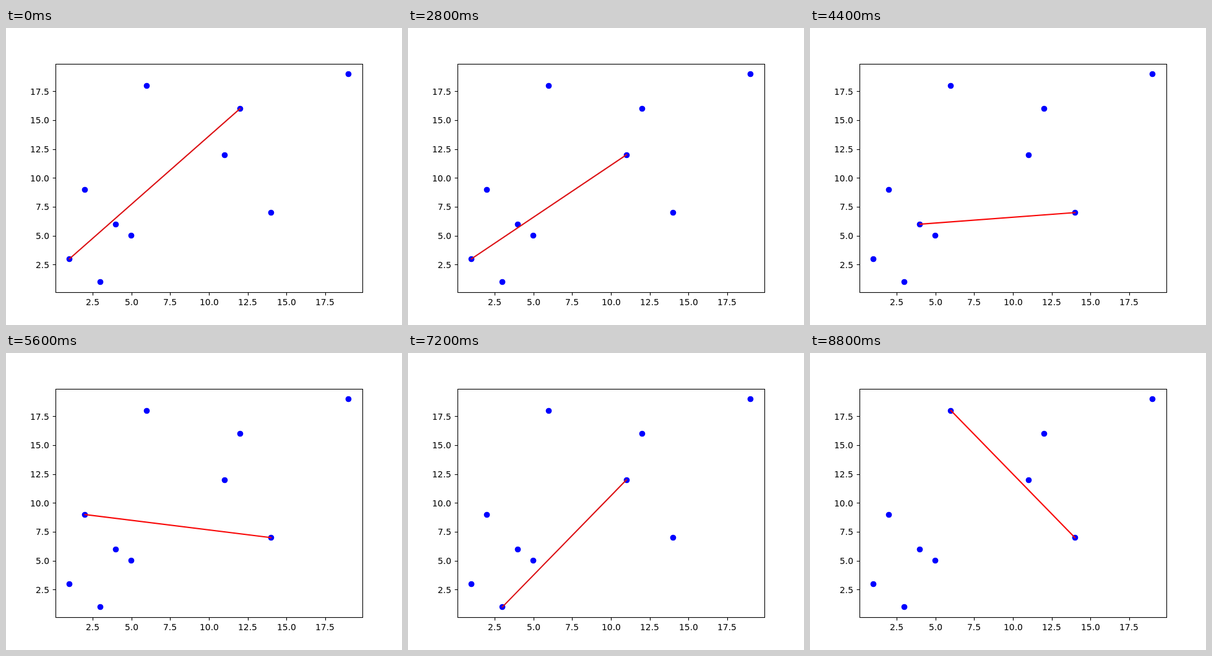
These frames come from a looping animation (640 px wide and 480 px high, 9 s). An HTML page with a canvas:

```html
<!DOCTYPE html>
<html lang="en">
<head>
<meta charset="utf-8">
<title>Point pairs</title>
<style>
  html, body { margin: 0; width: 640px; height: 480px; overflow: hidden; background: #fff; }
  canvas { display: block; }
</style>
</head>
<body>
<canvas id="plot" width="640" height="480"></canvas>
<script>
const ctx = document.getElementById('plot').getContext('2d');

const STEP_MS = 200;
const PT = 100 / 72; // pixels per typographic point
const AXES = { left: 80, top: 57.6, width: 496, height: 369.6 };
const RANGE = { min: 0.1, max: 19.9 };
const TICKS = [2.5, 5, 7.5, 10, 12.5, 15, 17.5];
const POINTS = [
  [12, 16], [1, 3], [4, 6], [2, 9], [19, 19],
  [3, 1], [5, 5], [11, 12], [14, 7], [6, 18]
];

// Every unordered pair, in order of its first point and then its second.
const PAIRS = POINTS.flatMap((a, i) => POINTS.slice(i + 1).map(b => [a, b]));

const span = RANGE.max - RANGE.min;
const toX = v => AXES.left + AXES.width * (v - RANGE.min) / span;
const toY = v => AXES.top + AXES.height * (RANGE.max - v) / span;
const snapLine = v => Math.floor(v + 0.5) + 0.5;
const snapDot = v => Math.floor(v) + 0.5;

function segment(x1, y1, x2, y2) {
  ctx.beginPath();
  ctx.moveTo(x1, y1);
  ctx.lineTo(x2, y2);
  ctx.stroke();
}

function drawDots() {
  ctx.fillStyle = '#0000ff';
  for (const [x, y] of POINTS) {
    ctx.beginPath();
    ctx.arc(snapDot(toX(x)), snapDot(toY(y)), 3.5 * PT, 0, Math.PI * 2);
    ctx.fill();
  }
}

function drawAxes() {
  const left = snapLine(AXES.left);
  const top = snapLine(AXES.top);
  const right = snapLine(AXES.left + AXES.width);
  const bottom = snapLine(AXES.top + AXES.height);
  const tick = 3.5 * PT;

  ctx.strokeStyle = ctx.fillStyle = '#000';
  ctx.lineWidth = 0.8 * PT;
  ctx.lineCap = 'butt';
  ctx.strokeRect(left, top, right - left, bottom - top);

  ctx.font = `${10 * PT}px "DejaVu Sans", sans-serif`;
  ctx.textAlign = 'left';
  ctx.textBaseline = 'alphabetic';
  for (const value of TICKS) {
    const x = toX(value);
    const y = toY(value);
    const label = value.toFixed(1);
    const width = ctx.measureText(label).width;
    segment(snapLine(x), bottom, snapLine(x), bottom + tick);
    segment(left - tick, snapLine(y), left, snapLine(y));
    ctx.fillText(label, Math.round(x - width / 2), 448);
    ctx.fillText(label, Math.round(AXES.left - 2 * tick - width), Math.round(y + 5.3));
  }
}

function drawPair([[x1, y1], [x2, y2]]) {
  const rising = (y2 - y1) / (x2 - x1) > 0.5;
  ctx.strokeStyle = rising ? '#dc1014' : '#f80606';
  ctx.lineWidth = 1.5 * PT;
  ctx.lineCap = 'square';
  segment(toX(x1), toY(y1), toX(x2), toY(y2));
}

function render(time) {
  const step = Math.floor(time / STEP_MS) % PAIRS.length;
  ctx.fillStyle = '#fff';
  ctx.fillRect(0, 0, 640, 480);
  drawDots();
  drawPair(PAIRS[step]);
  drawAxes();
}

const start = performance.now();
function tick() {
  render(performance.now() - start);
  requestAnimationFrame(tick);
}
tick();
</script>
</body>
</html>
```
